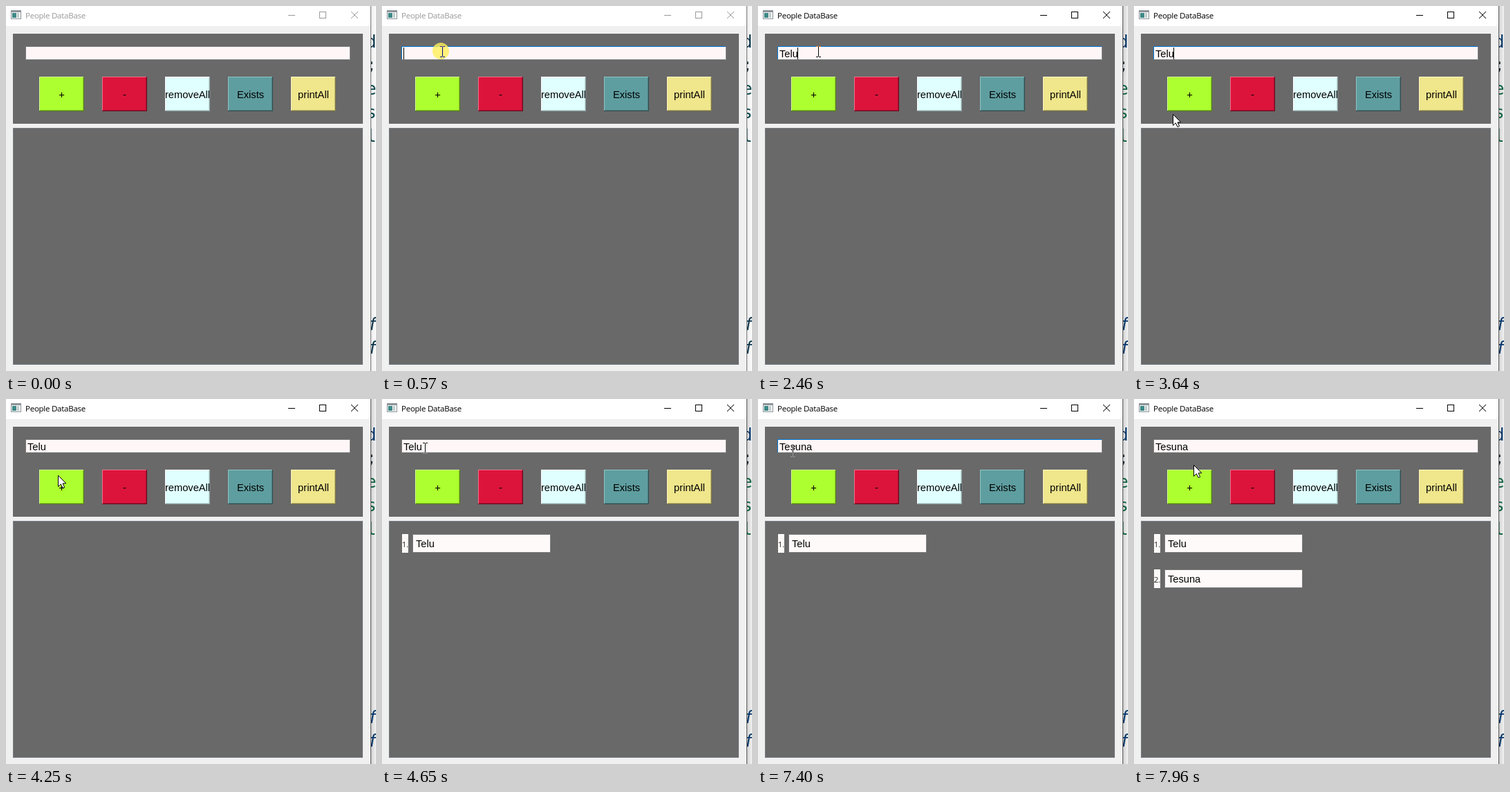
Write an HTML page with a canvas that moves like this. It is 535x527 px and loops after 7.99 s.

```html
<!DOCTYPE html>
<html lang="en">
<head>
<meta charset="utf-8">
<title>People DataBase</title>
<style>
  html, body { margin: 0; width: 100%; height: 100%; overflow: hidden; background: #fff; }
  canvas { display: block; }
</style>
</head>
<body>
<canvas id="stage" width="535" height="527"></canvas>
<script>
const ctx = document.getElementById('stage').getContext('2d', { alpha: false });
const LOOP = 7990;
const SANS = '14.67px "Liberation Sans", Arial, sans-serif';
const UI = '11.5px "Open Sans", "Noto Sans", sans-serif';
const CODE = '24px "DejaVu Sans Mono", monospace';
const FIELD = { x: 28, y: 58, w: 470, h: 20 };
const ACTIVE_AT = 600;

const typed = [
  [0, ''], [1810, 'T'], [2040, 'Te'], [2280, 'Tel'], [2460, 'Telu'],
  [6120, 'Tes'], [6300, 'Tesu'], [6510, 'Tesun'], [6790, 'Tesuna']
];
const rows = [[4370, 'Telu'], [7760, 'Tesuna']];
const focusSpans = [[500, 4190], [4930, 7640]];
const caretSpans = [[500, 1090], [1610, 3090], [3610, 4100], [4930, 5300], [5960, 7400]];
const clicks = [[490, 600, 680], [4270, 4370, 4430], [4930, 5450, 5580], [7640, 7740, 7800]];

// Pointer path: time, x, y
const path = [
  [90, 478, 532], [450, 87, 66], [3300, 87, 66], [3440, 55, 160], [3590, 55, 160],
  [3900, 75, 110], [4430, 75, 110], [4650, 62, 71], [4930, 62, 71], [5240, 46, 70],
  [7370, 46, 70], [7400, 50, 76], [7580, 80, 122], [7790, 80, 122], [7950, 86, 95], [LOOP, 86, 95]
];

const buttons = [
  ['+', '#adff2f', '#d4ff92', '#567f17'],
  ['-', '#dc143c', '#ef6f88', '#6e0a1e'],
  ['removeAll', '#e0ffff', '#ffffff', '#8fa3a3'],
  ['Exists', '#5f9ea0', '#8fc3c5', '#2f4f50'],
  ['printAll', '#f0e68c', '#fff8c0', '#787346']
];

const within = (spans, t) => spans.some(([a, b]) => t >= a && t < b);
const ease = k => k * k * (3 - 2 * k);

function rect(x, y, w, h, color) {
  ctx.fillStyle = color;
  ctx.fillRect(x, y, w, h);
}

function frame(x, y, w, h, color) {
  ctx.strokeStyle = color;
  ctx.lineWidth = 1;
  ctx.strokeRect(x + .5, y + .5, w - 1, h - 1);
}

function text(str, x, y, font, color, align = 'left') {
  ctx.font = font;
  ctx.fillStyle = color;
  ctx.textAlign = align;
  ctx.fillText(str, x, y);
}

function line(points, color) {
  ctx.beginPath();
  points.forEach(([x, y], i) => i % 2 ? ctx.lineTo(x, y) : ctx.moveTo(x, y));
  ctx.strokeStyle = color;
  ctx.lineWidth = 1;
  ctx.stroke();
}

function widthOf(str) {
  ctx.font = SANS;
  return ctx.measureText(str).width;
}

function pointerAt(t) {
  if (t < path[0][0]) return null;
  const i = path.findIndex(p => p[0] > t);
  const [t0, x0, y0] = path[i - 1], [t1, x1, y1] = path[i];
  const k = ease((t - t0) / (t1 - t0));
  return { x: x0 + (x1 - x0) * k, y: y0 + (y1 - y0) * k };
}

function drawBackdrop(active) {
  rect(527, 0, 8, 527, '#fff');
  const blue = active ? '#0b3f78' : '#0e3a50';
  const green = active ? '#117048' : '#0b4b50';
  const glyphs = [['d', blue], [';', '#1c2a33'], ['e', green], ['s', green], ['l', green]];
  glyphs.forEach(([c, color], i) => text(c, 521, 60 + 34 * i, CODE, color));
  [468, 502].forEach(y => text('f', 523, y, 'italic ' + CODE, blue));
  const shade = ctx.createLinearGradient(528, 0, 535, 0);
  shade.addColorStop(0, active ? 'rgba(0,0,0,.18)' : 'rgba(0,0,0,.08)');
  shade.addColorStop(1, active ? 'rgba(0,0,0,.05)' : 'rgba(0,0,0,.01)');
  rect(528, 0, 7, 527, shade);
}

function drawWindow(active) {
  const ink = active ? '#000' : '#999';
  rect(0, 0, 527, 527, '#f0f0f0');
  rect(0, 0, 527, 29, '#fff');
  rect(527, 0, 1, 527, active ? '#555' : '#777');

  rect(7, 6, 15, 13, '#8d9499');
  rect(8, 9, 13, 9, '#f4f6f6');
  rect(9, 10, 6, 7, '#3f8a88');
  rect(16, 10, 3, 7, '#c3cccc');

  ctx.letterSpacing = '-0.25px';
  text('People DataBase', 28, 18, UI, ink);
  ctx.letterSpacing = '0px';
  line([[408, 13.5], [418, 13.5]], ink);
  frame(453, 8, 10, 10, ink);
  line([[499, 8], [509, 18], [509, 8], [499, 18]], ink);

  rect(10, 40, 506, 130, '#696969');
  rect(10, 176, 506, 342, '#696969');
  frame(10, 176, 506, 342, '#757982');
}

function drawButton([label, fill, light, dark], i) {
  const x = 48 + 91 * i, y = 102;
  rect(x, y, 65, 50, dark);
  rect(x, y, 64, 49, light);
  rect(x + 1, y + 1, 63, 48, fill);
  ctx.globalAlpha = .45;
  rect(x + 1, y + 48, 63, 1, dark);
  rect(x + 63, y + 1, 1, 47, dark);
  ctx.globalAlpha = 1;
  ctx.save();
  ctx.beginPath();
  ctx.rect(x, y, 65, 50);
  ctx.clip();
  text(label, x + 32.5, 133, SANS, '#000', 'center');
  ctx.restore();
}

// Left edge of the marked text while the pointer is dragged backwards
function selectionStart(t, pointer) {
  if (t < 4930 || t >= 6120) return null;
  const stops = ['Te', 'Tel', 'Telu'].map(s => 31 + widthOf(s));
  return stops.find(x => pointer.x <= x + 3) ?? stops[2];
}

function drawField(t, pointer) {
  const { x, y, w, h } = FIELD;
  const focused = within(focusSpans, t);
  const value = typed.findLast(s => s[0] <= t)[1];
  const end = 31 + widthOf(value);
  rect(x, y, w, h, '#7a7a7a');
  rect(x + 1, y + 1, w - 2, h - 2, '#fff6f7');
  if (focused) {
    rect(x, y, w - 1, 1, '#0078d7');
    rect(x, y, 1, h - 1, '#0078d7');
  }
  text(value, 31, 74, SANS, '#000');

  const start = selectionStart(t, pointer);
  if (start !== null && start < end) {
    const left = Math.floor(start), wide = Math.floor(end) - left;
    rect(left, 60, wide, 17, '#0078d7');
    ctx.save();
    ctx.beginPath();
    ctx.rect(left, 60, wide, 17);
    ctx.clip();
    text(value, 31, 74, SANS, '#fff');
    ctx.restore();
  }
  if (within(caretSpans, t)) rect(Math.floor(start ?? end), 60, 1, 17, '#000');
}

function drawRow(name, i) {
  const y = 195 + 51 * i;
  rect(29, y, 9, 27, '#fffafa');
  text(i + 1 + '.', 28.7, y + 19, UI, '#222');
  rect(44, y, 200, 27, '#7a7a7a');
  rect(45, y + 1, 198, 25, '#fffafa');
  text(name, 49, y + 19, SANS, '#000');
}

function drawHalo(t, { x, y }) {
  const click = clicks.find(([a, , c]) => t >= a && t < c);
  if (!click) return;
  const [, hold, gone] = click;
  ctx.globalAlpha = .8 * (t < hold ? 1 : (gone - t) / (gone - hold));
  ctx.fillStyle = '#fff05a';
  ctx.beginPath();
  ctx.arc(x - 2, y - 1, 12, 0, Math.PI * 2);
  ctx.fill();
  ctx.globalAlpha = 1;
}

function drawPointer(p) {
  const x = Math.round(p.x), y = Math.round(p.y);
  const { x: fx, y: fy, w, h } = FIELD;
  ctx.save();
  if (x >= fx && x < fx + w && y >= fy && y < fy + h) {
    ctx.globalCompositeOperation = 'difference';
    rect(x, y - 7, 1, 14, '#fff');
    [-8, 7].forEach(d => {
      rect(x - 3, y + d, 3, 1, '#fff');
      rect(x + 1, y + d, 3, 1, '#fff');
    });
  } else {
    ctx.translate(x, y);
    const arrow = new Path2D('M.5 .5V16.5L4.3 12.9L7 18.6L9.6 17.5L7 11.9H11.8Z');
    ctx.fillStyle = '#fff';
    ctx.strokeStyle = '#000';
    ctx.lineWidth = 1;
    ctx.fill(arrow);
    ctx.stroke(arrow);
  }
  ctx.restore();
}

function draw(t) {
  const active = t >= ACTIVE_AT;
  const pointer = pointerAt(t);
  drawBackdrop(active);
  drawWindow(active);
  drawField(t, pointer);
  buttons.forEach(drawButton);
  rows.forEach(([at, name], i) => { if (t >= at) drawRow(name, i); });
  if (pointer) {
    drawHalo(t, pointer);
    drawPointer(pointer);
  }
}

const begun = performance.now();
function tick() {
  draw((performance.now() - begun) % LOOP);
  requestAnimationFrame(tick);
}
tick();
</script>
</body>
</html>
```
